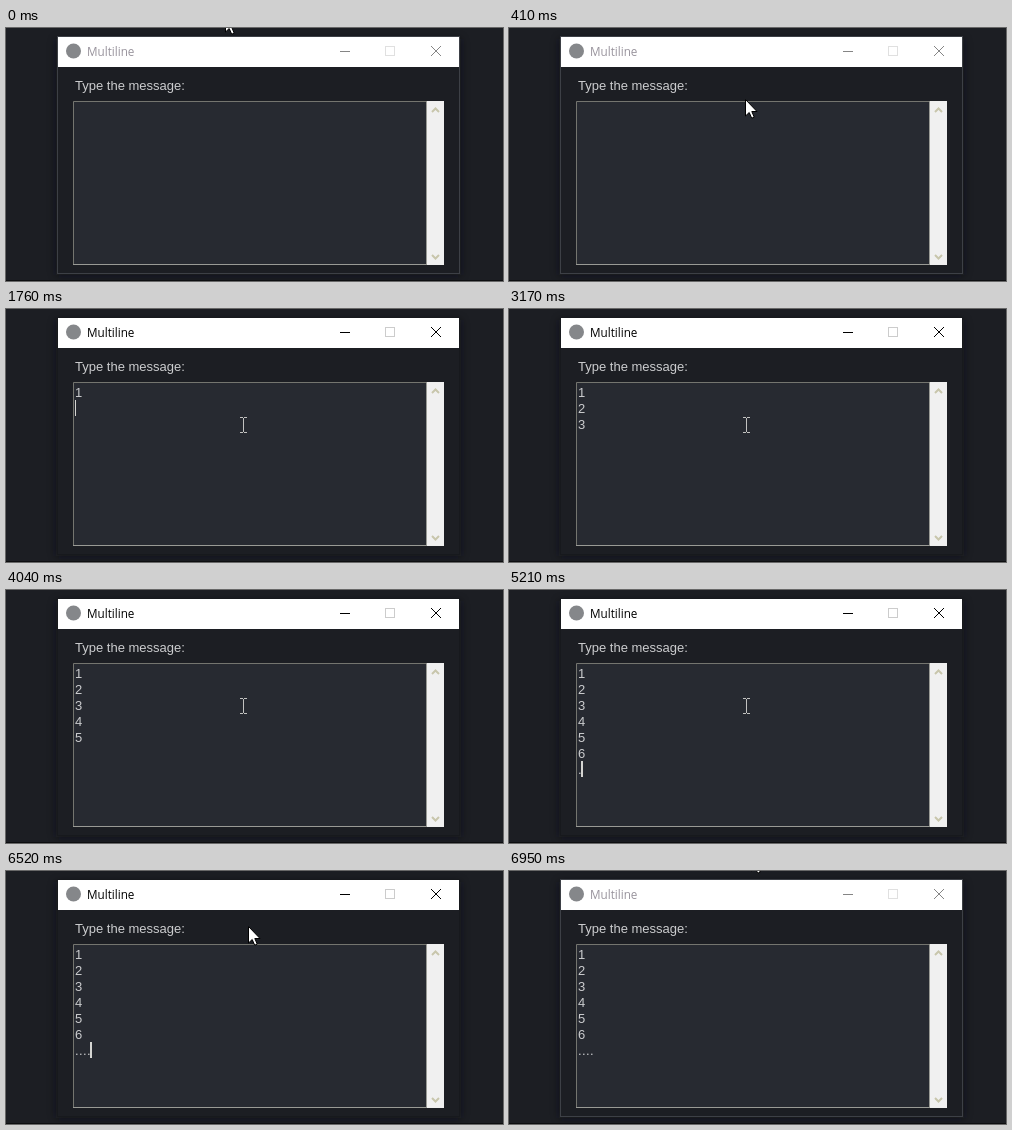
Recreate the animation shown at these times as an HTML page. Size 497 by 253 pixels, loop 7450 ms.

```html
<!DOCTYPE html>
<html lang="en">
<head>
<meta charset="utf-8">
<title>Multiline</title>
<style>
  html, body { margin: 0; width: 100%; height: 100%; overflow: hidden; background: #1c1e23; }
  svg { display: block; }
  .body { font: 13px "Liberation Sans", Arial, sans-serif; fill: #cccdcf; }
  .title { font: 11.7px "Open Sans", "Noto Sans", sans-serif; fill: #000; }
  .line { fill: none; stroke: #000; }
  .edge { fill: none; stroke: #17191d; }
  .disabled { stroke: #ccc; }
  .inactive .title { fill: #98939c; }
  .inactive .line { stroke: #858585; }
  .inactive .disabled { stroke: #e0e0e0; }
  .inactive .edge { stroke: #3d4046; }
  .chevron { fill: none; stroke: #c8c6ac; stroke-width: 2; }
</style>
</head>
<body>
<svg width="497" height="253" viewBox="0 0 497 253">
  <defs>
    <filter id="soft" x="-10%" y="-10%" width="120%" height="120%">
      <feGaussianBlur stdDeviation="4"/>
    </filter>
  </defs>
  <rect width="497" height="253" fill="#1c1e23"/>
  <rect x="50" y="11" width="405" height="236" fill="#101115" opacity=".55" filter="url(#soft)"/>
  <rect y="252" width="497" height="1" fill="#0d0e10"/>

  <g id="window" class="inactive">
    <rect x="52" y="9" width="401" height="236" fill="#1c1e23"/>
    <rect class="edge" x="51.5" y="8.5" width="402" height="237"/>
    <rect x="52" y="9" width="401" height="30" fill="#fff"/>
    <circle cx="67.5" cy="23" r="7.5" fill="#85878a"/>
    <text class="title" x="81" y="28">Multiline</text>
    <path class="line" d="M334 23.5h10"/>
    <rect class="line disabled" x="379.5" y="18.5" width="9" height="9"/>
    <path class="line" d="M425 18l10 10M435 18l-10 10"/>
  </g>

  <text class="body" x="69" y="62">Type the message:</text>
  <rect x="67" y="73" width="354" height="164" fill="#272a31"/>
  <path d="M420.5 73.5H67.5V236.5" fill="none" stroke="#74756f"/>
  <path d="M67 236.5H421M420.5 73V237" stroke="#999a95"/>
  <rect x="421" y="73" width="17" height="164" fill="#f0f0f0"/>
  <path class="chevron" d="M426 84l3.5-3.5L433 84M426 227l3.5 3.5L433 227"/>

  <g id="typed" class="body"></g>
  <rect id="caret" width="2" height="16" fill="#d5d5d2"/>

  <path id="arrow" d="M.5.5V17L4.2 13.5 6.7 19.2 9.2 18.1 6.8 12.5H12Z" fill="#fff" stroke="#000"/>
  <path id="beam" d="M-3.5-7.5H-.5M.5-7.5H3.5M0-7V7M-3.5 7.5H-.5M.5 7.5H3.5" fill="none" stroke="#c2c2c0"/>
</svg>
<script>
  const LOOP = 7450;
  const FOCUS = 800, BLUR = 6950;
  const LEFT = 69, TOP = 75, LINE = 16, ASCENT = 13;

  const strokes = [
    [1600, "1"], [1760, "\n"], [2020, "2"], [2150, "\n"],
    [2600, "3"], [2750, "\n"], [3270, "4"], [3380, "\n"],
    [3810, "5"], [4020, "\n"], [4490, "6"], [4680, "\n"],
    [5210, "."], [5370, "."], [5600, "."], [5780, "."]
  ];
  const blinks = [FOCUS, 1420, 1710, 2290, 2580, 3170, 3460, 4040,
                  4350, 4920, 5210, 5800, 6090, 6680];
  // time, x, y of the pointer's hot spot
  const path = [
    [0, 219, -13], [140, 219, -13], [250, 228, 30], [410, 236, 71], [520, 236, 71],
    [680, 237, 102], [800, 237, 116], [6395, 237, 116], [6520, 242, 55],
    [6710, 242, -17], [LOOP, 242, -17]
  ];

  const byId = id => document.getElementById(id);
  const [win, typed, caret, arrow, beam] =
    ["window", "typed", "caret", "arrow", "beam"].map(byId);
  const show = (node, on) => node.setAttribute("visibility", on ? "visible" : "hidden");
  const place = (node, x, y) => node.setAttribute("transform", `translate(${x} ${y})`);

  // Lay the characters out on whole pixels and keep the caret spot after each.
  let x = LEFT, y = TOP;
  const spots = [[x, y]];
  const glyphs = strokes.map(([, char]) => {
    let glyph = null;
    if (char === "\n") {
      x = LEFT;
      y += LINE;
    } else {
      glyph = document.createElementNS(typed.namespaceURI, "text");
      glyph.textContent = char;
      glyph.setAttribute("x", x);
      glyph.setAttribute("y", y + ASCENT);
      typed.append(glyph);
      x += char === "." ? 4 : 7;
    }
    spots.push([x, y]);
    return glyph;
  });

  function pointerAt(t) {
    const i = path.findIndex(([end]) => end > t);
    const [t0, x0, y0] = path[i - 1], [t1, x1, y1] = path[i];
    const k = (t - t0) / (t1 - t0);
    return [Math.round(x0 + (x1 - x0) * k), Math.round(y0 + (y1 - y0) * k)];
  }

  function render(t) {
    win.classList.toggle("inactive", t < FOCUS || t >= BLUR);

    const count = strokes.filter(([time]) => time <= t).length;
    glyphs.forEach((glyph, i) => glyph && show(glyph, i < count));

    const [cx, cy] = spots[count];
    const atStart = cx === LEFT;
    caret.setAttribute("width", atStart ? 1 : 2);
    place(caret, atStart ? cx : cx - 1, cy);
    show(caret, blinks.filter(time => time <= t).length % 2);

    const [px, py] = pointerAt(t);
    const overText = py >= 74;
    show(arrow, !overText);
    show(beam, overText);
    place(arrow, px, py);
    place(beam, px + .5, py);
  }

  const start = performance.now();
  function tick() {
    render((performance.now() - start) % LOOP);
    requestAnimationFrame(tick);
  }
  tick();
</script>
</body>
</html>
```
